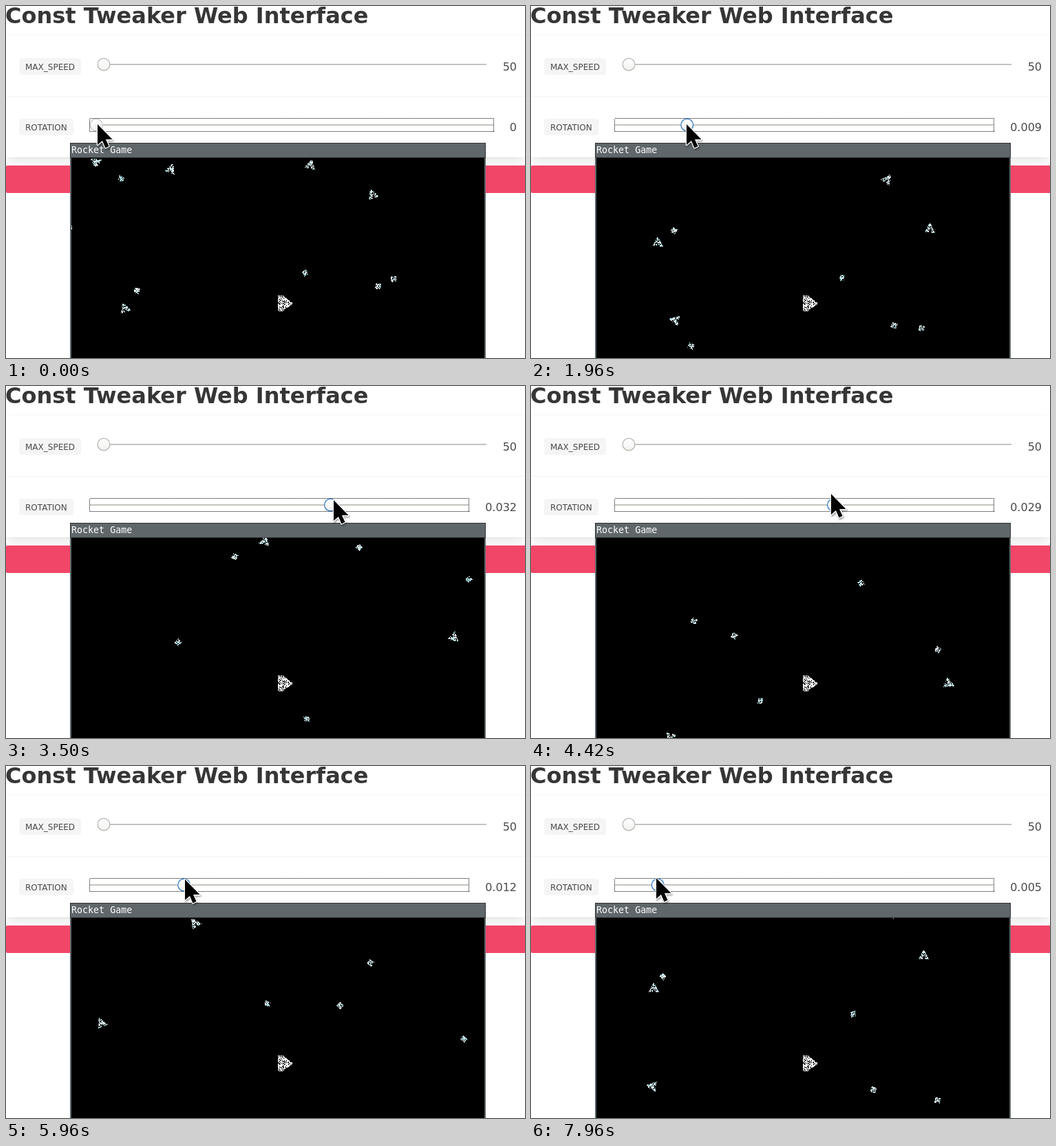
These frames come from a looping animation (754 by 512 pixels, 8000 ms). An HTML page:

```html
<!DOCTYPE html>
<html lang="en">
<head>
<meta charset="utf-8">
<title>Const Tweaker Web Interface</title>
<style>
  html, body { margin: 0; width: 100%; height: 100%; overflow: hidden; background: #fff; }
  .stage { position: relative; width: 100%; height: 100%; overflow: hidden; contain: strict; }
  .box {
    position: absolute; inset: 43px 0 auto; height: 177px;
    box-shadow: 0 8px 16px -2px rgba(10, 10, 10, .1), 0 0 0 1px rgba(10, 10, 10, .02);
  }
  svg { position: absolute; inset: 0; display: block; width: 100%; height: 100%; }
  text { font-family: "DejaVu Sans", sans-serif; fill: #4a4a4a; }
  .title { font-size: 32px; font-weight: 700; fill: #363636; }
  .tag { font-size: 12px; }
  .value { font-size: 16px; text-anchor: end; }
  .mono { font: 13.33px "DejaVu Sans Mono", monospace; fill: #fff; }
  .track { stroke: #c4c4bf; stroke-width: 2; }
  .thumb { fill: url(#knob); stroke: #b4b4ae; stroke-width: 1.2; }
</style>
</head>
<body>
<div class="stage">
<div class="box"></div>
<svg viewBox="0 0 754 512">
  <defs>
    <linearGradient id="knob" x1="0" y1="0" x2="0" y2="1">
      <stop offset="0" stop-color="#fff"/><stop offset="1" stop-color="#f1f1f0"/>
    </linearGradient>
    <clipPath id="view"><rect x="95" y="221" width="600" height="291"/></clipPath>
    <filter id="soft" x="-30%" y="-30%" width="170%" height="170%">
      <feDropShadow dx="1" dy="2" stdDeviation="1.3" flood-opacity=".4"/>
    </filter>
  </defs>
  <text class="title" x="-1" y="25">Const Tweaker Web Interface</text>
  <path d="M0 131.5H754" stroke="#f5f5f5"/>

  <rect x="19" y="76" width="90" height="24" rx="4" fill="#f5f5f5"/>
  <text class="tag" x="28" y="93">MAX_SPEED</text>
  <path class="track" d="M133 85H698"/>
  <circle class="thumb" cx="142" cy="85" r="8.9"/>
  <text class="value" x="742" y="94">50</text>

  <rect x="19" y="164" width="79" height="24" rx="4" fill="#f5f5f5"/>
  <text class="tag" x="28" y="181">ROTATION</text>
  <path id="track" class="track"/>
  <circle id="thumb" class="thumb" cy="173" r="8.9"/>
  <rect id="focus" x="121.5" y="163.5" height="19" fill="none" stroke="#000"
    stroke-dasharray="1 1" shape-rendering="crispEdges"/>
  <text id="value" class="value" x="742" y="182"></text>

  <rect x="-1" y="232" width="770" height="40" rx="4" fill="#f14668"/>

  <g shape-rendering="crispEdges">
    <rect x="93" y="199" width="604" height="313" fill="#5f676a"/>
    <path d="M93 220.5H697M93.5 221V199.5H696.5V221" fill="none" stroke="#333"/>
    <rect x="95" y="221" width="600" height="291"/>
  </g>
  <text class="mono" x="95" y="214">Rocket Game</text>
  <g id="game" clip-path="url(#view)" shape-rendering="crispEdges"></g>
  <path id="cursor" d="M0 0V30L7 24L11.5 34.5L16.5 32L12 22H21.5Z" stroke="#fff"
    stroke-width="2.4" stroke-linejoin="round" paint-order="stroke" filter="url(#soft)"/>
</svg>
</div>
<script>
const LOOP = 8000, FPS = 24, RAD = Math.PI / 180;
const PIVOT = { x: 400, y: 426 };
const SPEED = 6, MIDWAY = 4;
const $ = id => document.getElementById(id);

// where the slider is dragged: game time, rotation per tick
const DRAG = [
  [0, 0], [.3, 0], [1, .0042], [1.79, .009], [2.5, .0155], [2.9, .0205], [3.29, .0322],
  [4, .031], [5.12, .0176], [5.69, .012], [6.5, .011], [7.7, .0046], [8, .0046]
];

// place around the pivot midway through the loop, heading in degrees
const SHIPS = [
  [48, -219, -77], [124, -175, -110], [-235, -10, -108],
  [-152, -212, -70], [-180, 102, 170], [-290, -214, -144]
];
const ROCKS = [
  [-223, -32, -123], [123, -2, 137], [40, -61, -77], [-242, -197, -113], [-325, -121, -136],
  [182, -14, 38], [-140, 135, 137], [84, -264, -20], [6, 160, 165], [200, 160, 40]
];

let seed = 7;
const random = () => (seed = seed * 16807 % 2147483647) / 2147483647;

const rockShape = (x, y) => Math.abs(x) + Math.abs(y) <= 5.5;
const shipShape = (x, y) =>
  x > -7 && Math.abs(y) < (8 - x) * .52 && !(x < -3 && Math.abs(y) < 1.5);
const rocketShape = (x, y) =>
  x >= -10 && Math.abs(y) < Math.min(12, (12 - x) * .75) && !(x < -7 && Math.abs(y) < 1);

function add(parent, tag, attrs = {}) {
  const el = document.createElementNS("http://www.w3.org/2000/svg", tag);
  for (const k in attrs) el.setAttribute(k, attrs[k]);
  return parent.appendChild(el);
}

// speckled sprite: pale pixels scattered inside a shape
function sprite(inside, density, tint) {
  const g = add($("game"), "g");
  let white = "", cyan = "";
  for (let y = -12; y <= 12; y++) for (let x = -12; x <= 12; x++) {
    if (!inside(x, y) || random() > density) continue;
    const cell = `M${x - .5} ${y - .5}h1v1h-1z`;
    if (random() < tint) cyan += cell; else white += cell;
  }
  add(g, "path", { d: white, fill: "#f4f4f4" });
  add(g, "path", { d: cyan, fill: "#8fcfd4" });
  return g;
}

const drifter = shape => ([x, y, heading]) =>
  ({ el: sprite(shape, .72, .4), x, y, heading: heading * RAD });

const bodies = [...SHIPS.map(drifter(shipShape)), ...ROCKS.map(drifter(rockShape))];
sprite(rocketShape, .7, 0).setAttribute("transform", "translate(405.5 432.5)");

function rateAt(g) {
  const i = Math.max(1, DRAG.findIndex(p => p[0] >= g));
  const [t0, a] = DRAG[i - 1], [t1, b] = DRAG[i];
  return a + (b - a) * (g - t0) / (t1 - t0);
}

// area under the rotation curve, at 60 ticks a second
function turnAt(g) {
  const pts = [...DRAG.filter(p => p[0] < g), [g, rateAt(g)]];
  let sum = 0;
  for (let i = 1; i < pts.length; i++) {
    sum += (pts[i][0] - pts[i - 1][0]) * (pts[i][1] + pts[i - 1][1]) / 2;
  }
  return sum * 60;
}

const thumbAt = rate => 131 + rate * 10640;
const bump = (g, mid, width) => Math.exp(-(((g - mid) / width) ** 2));
const handY = g => 172 - 17 * bump(g, 4.6, 1.25) - 9 * bump(g, 7.75, .5);

function draw(ms) {
  const t = Math.floor((ms + 5) * FPS / 1000) / FPS;
  const g = t - Math.min(Math.max(t - 1, 0), .208); // short stall after one second
  const rate = rateAt(g);
  const shown = Math.round(rate * 1000) / 1000;
  const end = shown ? 673 : 709;

  $("value").textContent = shown ? shown.toFixed(3) : "0";
  $("track").setAttribute("d", `M122 173H${end - 1}`);
  $("focus").setAttribute("width", end - 122);
  $("thumb").setAttribute("cx", thumbAt(shown));
  $("thumb").style.stroke = shown ? "#2a76c6" : "#c8c8c4";
  $("cursor").setAttribute("transform",
    `translate(${Math.round(thumbAt(rate) + 2)} ${Math.round(handY(g))})`);

  const turn = turnAt(g), cos = Math.cos(turn), sin = Math.sin(turn);
  for (const b of bodies) {
    const way = SPEED * (g - MIDWAY);
    const x = b.x + way * Math.cos(b.heading), y = b.y + way * Math.sin(b.heading);
    const sx = PIVOT.x + x * cos - y * sin, sy = PIVOT.y + x * sin + y * cos;
    const angle = (b.heading + turn) / RAD;
    b.el.setAttribute("transform",
      `translate(${sx.toFixed(2)} ${sy.toFixed(2)}) rotate(${angle.toFixed(2)})`);
  }
}

const start = performance.now();
function tick() {
  draw((performance.now() - start) % LOOP);
  requestAnimationFrame(tick);
}
tick();
</script>
</body>
</html>
```
